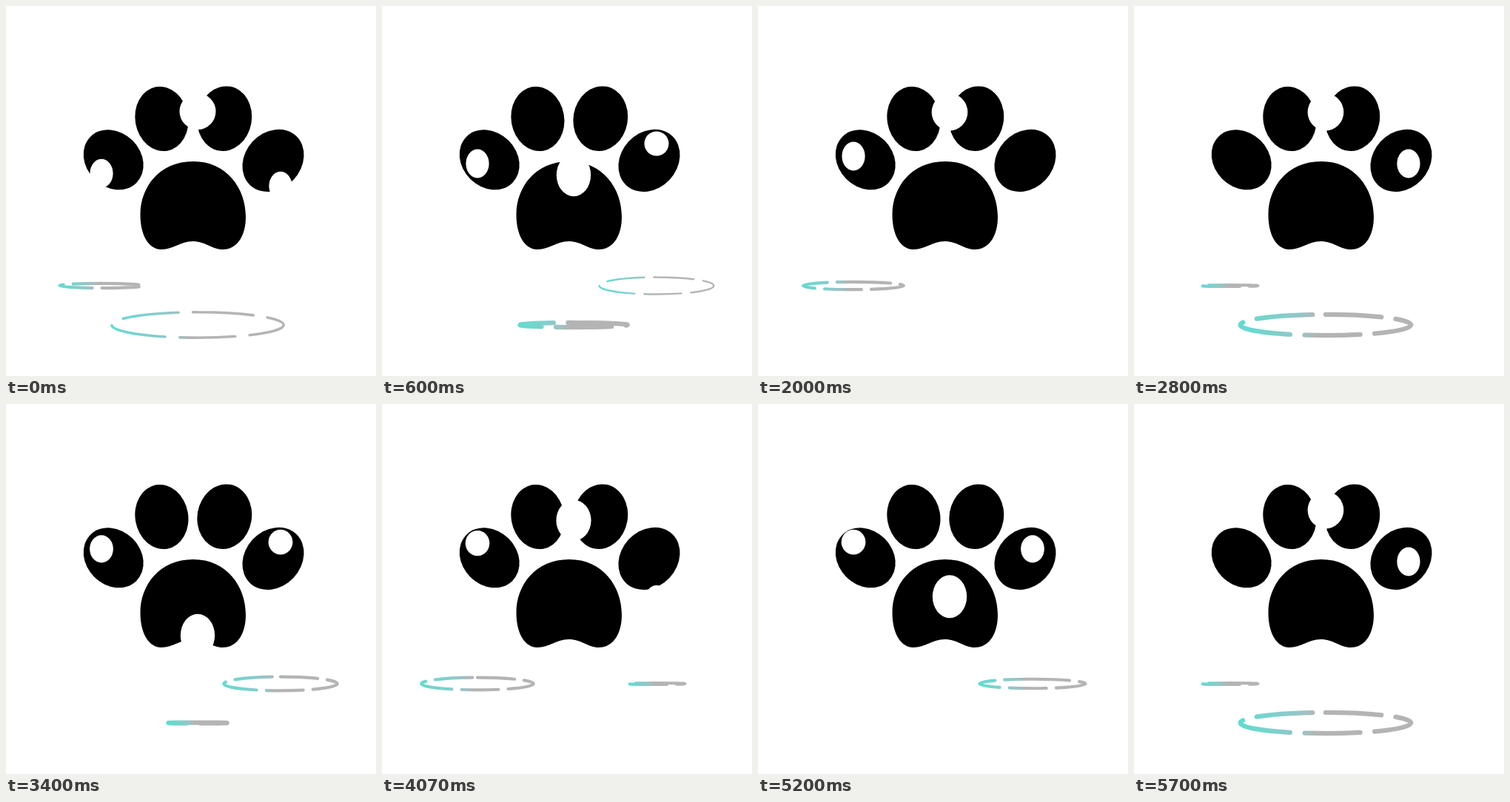
Write an HTML page that moves like this. It is 500 px wide and 500 px high and loops after 5.73 s.

```html
<!DOCTYPE html>
<html lang="en">
<head>
<meta charset="utf-8">
<title>Paw</title>
<style>
  html, body { margin: 0; width: 100%; height: 100%; overflow: hidden; background: #fff; }
  svg { display: block; width: 100vw; height: 100vh; }
  .ball { fill: #fff; }
  .ring { fill: none; stroke: url(#tint); stroke-linecap: round; }
</style>
</head>
<body>
<svg viewBox="0 0 500 500">
  <defs>
    <linearGradient id="tint">
      <stop offset="0" stop-color="#63dbcf"/>
      <stop offset=".2" stop-color="#7bd1cc"/>
      <stop offset=".36" stop-color="#99c4c6"/>
      <stop offset=".46" stop-color="#b4b4b4"/>
      <stop offset="1" stop-color="#b4b4b4"/>
    </linearGradient>
  </defs>
  <g id="paw">
    <ellipse rx="36.7" ry="44" transform="translate(145.2 207.8) rotate(-45)"/>
    <ellipse rx="35.8" ry="43.8" transform="translate(210.4 152.5) rotate(-10)"/>
    <ellipse rx="36.7" ry="44" transform="translate(295.3 152.2) rotate(10)"/>
    <ellipse rx="37.8" ry="45.5" transform="translate(361 208.9) rotate(43)"/>
    <path d="M253 210C298 210 324 246 324 285C324 311 312 329 293 329C278 329 270 318 252 318C236 318 226 329 210 329C193 329 181.5 310 181.5 282C181.5 245 207 210 253 210Z"/>
  </g>
  <g id="drops"></g>
</svg>
<script>
const LOOP = 5730;   // ms
const CYCLE = 24;    // steps in one bounce
const mod = (a, n) => ((a % n) + n) % n;

// apex: step at which the ball is highest; floor: height of its ripple
const drops = [
  { x: 129, top: 186, r: 16.5, floor: 378, scale: 1, apex: 8 },
  { x: 259, top: 142.5, r: 24.5, floor: 431, scale: 1.5, apex: 0 },
  { x: 371, top: 186, r: 16.5, floor: 378, scale: 1, apex: 15 },
];

const layer = document.getElementById('drops');
function add(tag, cls) {
  const el = document.createElementNS('http://www.w3.org/2000/svg', tag);
  el.setAttribute('class', cls);
  return layer.appendChild(el);
}
function set(el, attrs) {
  for (const name in attrs) el.setAttribute(name, attrs[name]);
}
for (const d of drops) {
  d.ball = add('ellipse', 'ball');
  d.ring = add('path', 'ring');
  d.ring.setAttribute('stroke-dasharray', `${50 * d.scale} ${13 * d.scale}`);
}

// 25 steps a second, shown on a 30 Hz clock rounded to 10 ms
function stepAt(ms) {
  const tick = Math.ceil((Math.floor(ms / 10) + 0.5) * 0.3) - 1;
  return Math.floor(tick * 5 / 6);
}

function drawBall(d, step) {
  const away = Math.abs(mod(step - d.apex + 12, CYCLE) - 12);
  const fall = 0.0785 * away ** 3 + 9 * Math.max(0, away - 10) ** 2;
  const stretch = 0.18 * Math.min(1, away * away / 36);
  set(d.ball, {
    cx: d.x,
    cy: d.top + fall * d.scale,
    rx: d.r * (1 - 0.3 * stretch),
    ry: d.r * (1 + stretch),
  });
}

function drawRing(d, step) {
  const age = mod(step - d.apex - 12, CYCLE);
  const shown = age > 0 && age < 14;
  d.ring.style.display = shown ? '' : 'none';
  if (!shown) return;
  const left = Math.max(0, 0.945 - 0.0745 * age);
  const rx = 77.5 * d.scale * (1 - left ** 3);
  const ry = d.scale * Math.max(0.3, 1.05 * age - 1.1);
  const arc = `a${rx} ${ry} 0 0 1 0 `;
  set(d.ring, {
    d: `M${d.x} ${d.floor - ry}${arc}${2 * ry}${arc}${-2 * ry}`,
    'stroke-width': 4.2 * d.scale * Math.min(1, (14 - age) / 3.5),
  });
}

function draw() {
  const step = stepAt(performance.now() % LOOP);
  for (const d of drops) {
    drawBall(d, step);
    drawRing(d, step);
  }
  requestAnimationFrame(draw);
}
draw();
</script>
</body>
</html>
```
